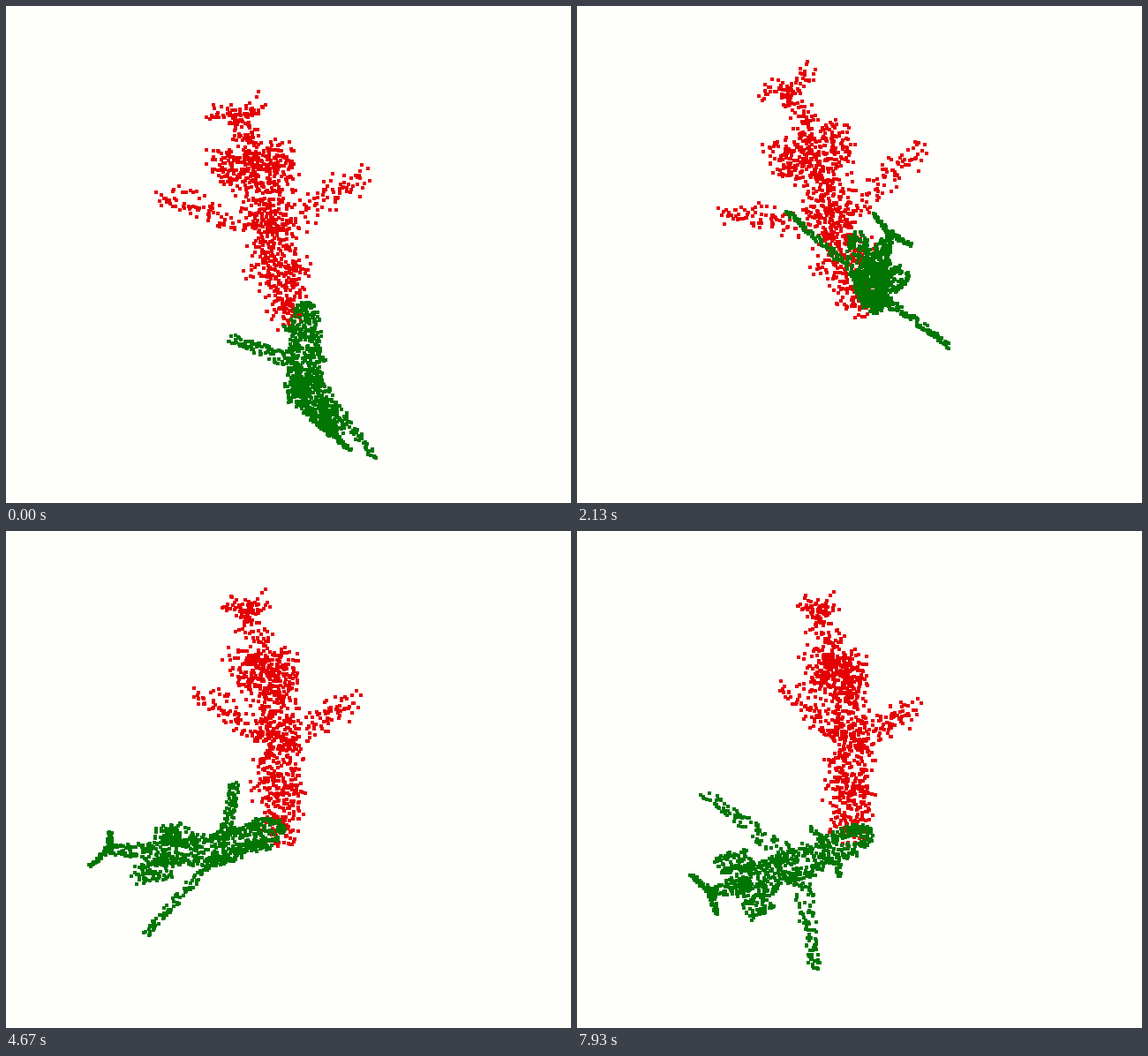
An HTML page for the animation above (8 s loop, 640x563 px).

```html
<!DOCTYPE html>
<html lang="en">
<head>
<meta charset="utf-8">
<title>Point clouds</title>
<style>
html, body { margin: 0; width: 100%; height: 100%; overflow: hidden; background: #fefefb; }
svg { display: block; width: 640px; height: 563px; }
</style>
</head>
<body>
<svg viewBox="0 0 640 563" shape-rendering="crispEdges">
  <path id="red" fill="#e40003"/>
  <path id="green" fill="#027603"/>
</svg>
<script>
const LOOP = 8000, STEP = 1000 / 15, SIZE = 4;
const CENTER = { x: 325, y: 350 };
const HEAD_LIFT = -20;   // the clouds turn about a point beside the head

function rng(seed) {
  return () => {
    seed = (seed + 0x6D2B79F5) | 0;
    let t = Math.imul(seed ^ (seed >>> 15), 1 | seed);
    t = (t + Math.imul(t ^ (t >>> 7), 61 | t)) ^ t;
    return ((t ^ (t >>> 14)) >>> 0) / 4294967296;
  };
}

// Solid model in 3D: s runs from head to tail, w to the side, n across the back.
function fish(seed, noise) {
  const rand = rng(seed), points = [];
  const bell = () => (rand() + rand() + rand() + rand() - 2) * 1.73;

  // Points on a tapered tube; flat squeezes it along n, round closes its start.
  function tube(count, from, to, r0, r1, flat = 1, round = 0) {
    for (let i = 0; i < count; i++) {
      const u = (i + rand()) / count, angle = rand() * 2 * Math.PI;
      const [s, w, n] = from.map((v, k) => v + (to[k] - v) * u);
      let r = (r0 + (r1 - r0) * u) * Math.sqrt(0.25 + 0.75 * rand());
      if (u < round) r *= Math.sqrt(1 - (1 - u / round) ** 2);
      // across the tube: sideways for the long body, lengthwise for the limbs
      const limb = Math.abs(to[1] - from[1]) > Math.abs(to[0] - from[0]);
      const c = Math.cos(angle) * r;
      points.push({
        s: s + (limb ? c : 0) + bell() * noise,
        w: w + (limb ? 0 : c) + bell() * noise,
        n: n + Math.sin(angle) * r * flat + HEAD_LIFT + bell() * noise
      });
    }
  }

  tube(310, [0, 0, 0], [130, 0, -2], 18, 20, 1, 0.22);
  tube(210, [120, 0, -2], [208, 0, -22], 21, 14);
  tube(85, [200, 0, -22], [266, 0, -47], 13, 5);
  for (const side of [-1, 1]) {
    tube(85, [172, side * 26, -15], [216, side * 31, -22], 14, 12);
    tube(28, [262, side * 2, -47], [274, side * 28, -51], 5, 3, 0.6);
    tube(85, [112, side * 14, 0], [165, side * 121, 0], 15, 8, 0.35);
    tube(16, [60, side * 14, 0], [68, side * 34, 0], 5, 3, 0.6);
  }
  return points;
}

// Each move: start, end, then the directions of the side and of the tail.
const greenMoves = [
  [0, 0, [0.69, 0.53, 0.49], [-0.02, 0.64, -0.77]],
  [400, 470, [0.66, 0.58, 0.54], [-0.02, 0.69, -0.72]],
  [800, 1600, [0.73, 0.64, -0.24], [0.08, -0.46, -0.88]],
  [1730, 2470, [0.79, 0.61, 0], [-0.21, 0.27, -0.94]],
  [2600, 3330, [0.5, 0.65, -0.57], [-0.87, 0.34, -0.36]],
  [3670, 4400, [-0.31, 0.67, -0.67], [-0.63, 0.21, 0.75]],
  [4670, 5330, [0.2, 0.75, -0.63], [-0.97, 0.24, -0.04]],
  [5400, 5930, [0.48, 0.83, -0.28], [-0.76, 0.31, -0.57]],
  [6270, 6530, [0.38, 0.92, -0.1], [-0.78, 0.41, -0.47]],
  [6530, 6800, [0.48, 0.85, -0.24], [-0.76, 0.34, -0.55]]
];
const redMoves = [
  [0, 0, [0.96, -0.08, 0.26], [-0.18, -0.94, 0.29]],
  [60, 130, [0.95, -0.03, 0.27], [-0.16, -0.86, 0.48]],
  [800, 1600, [0.87, -0.18, -0.1], [-0.23, -0.75, -0.62]],
  [1730, 2470, [0.82, -0.22, 0.53], [-0.24, -0.92, 0]],
  [2600, 3330, [0.36, -0.14, 0.92], [-0.18, -0.98, -0.08]],
  [3670, 4400, [0.72, 0.03, 0.69], [-0.02, -0.97, 0.05]],
  [4670, 5000, [0.95, 0, 0.3], [-0.02, -0.99, 0.1]],
  [5000, 5330, [0.59, 0.08, 0.8], [0.01, -0.99, 0.1]]
];

const dot = (a, b) => a.reduce((sum, v, i) => sum + v * b[i], 0);
const unit = a => a.map(v => v / Math.sqrt(dot(a, a)));
const mix = (a, b, k) => a.map((v, i) => v + (b[i] - v) * k);
const cross = (a, b) => [
  a[1] * b[2] - a[2] * b[1],
  a[2] * b[0] - a[0] * b[2],
  a[0] * b[1] - a[1] * b[0]];

// Rotation at time t as three perpendicular unit vectors.
function turnAt(moves, t) {
  let [, , side, tail] = moves[0];
  for (const [from, to, nextSide, nextTail] of moves.slice(1)) {
    if (t <= from) break;
    const k = Math.min(1, (t - from) / (to - from)), ease = k * k * (3 - 2 * k);
    side = mix(side, nextSide, ease);
    tail = mix(tail, nextTail, ease);
  }
  const b = unit(tail), slip = dot(side, b);
  const l = unit(side.map((v, i) => v - slip * b[i]));
  return { b, l, n: cross(l, b) };
}

function trace(points, { b, l, n }) {
  const place = (p, axis) => p.s * b[axis] + p.w * l[axis] + p.n * n[axis] - SIZE / 2;
  return points.map(p => {
    const x = Math.round(CENTER.x + place(p, 0)), y = Math.round(CENTER.y + place(p, 1));
    return `M${x} ${y}h${SIZE}v${SIZE}h-${SIZE}z`;
  }).join("");
}

const clouds = [
  { path: document.getElementById("red"), points: fish(21, 6.5), moves: redMoves },
  { path: document.getElementById("green"), points: fish(7, 0), moves: greenMoves }
];
let shown = -1;

function draw(time) {
  const step = Math.floor((time % LOOP) / STEP + 0.001);
  if (step === shown) return;
  shown = step;
  for (const c of clouds) c.path.setAttribute("d", trace(c.points, turnAt(c.moves, step * STEP)));
}

const start = performance.now();
function tick() {
  draw(performance.now() - start);
  requestAnimationFrame(tick);
}
draw(0);
requestAnimationFrame(tick);
</script>
</body>
</html>
```
